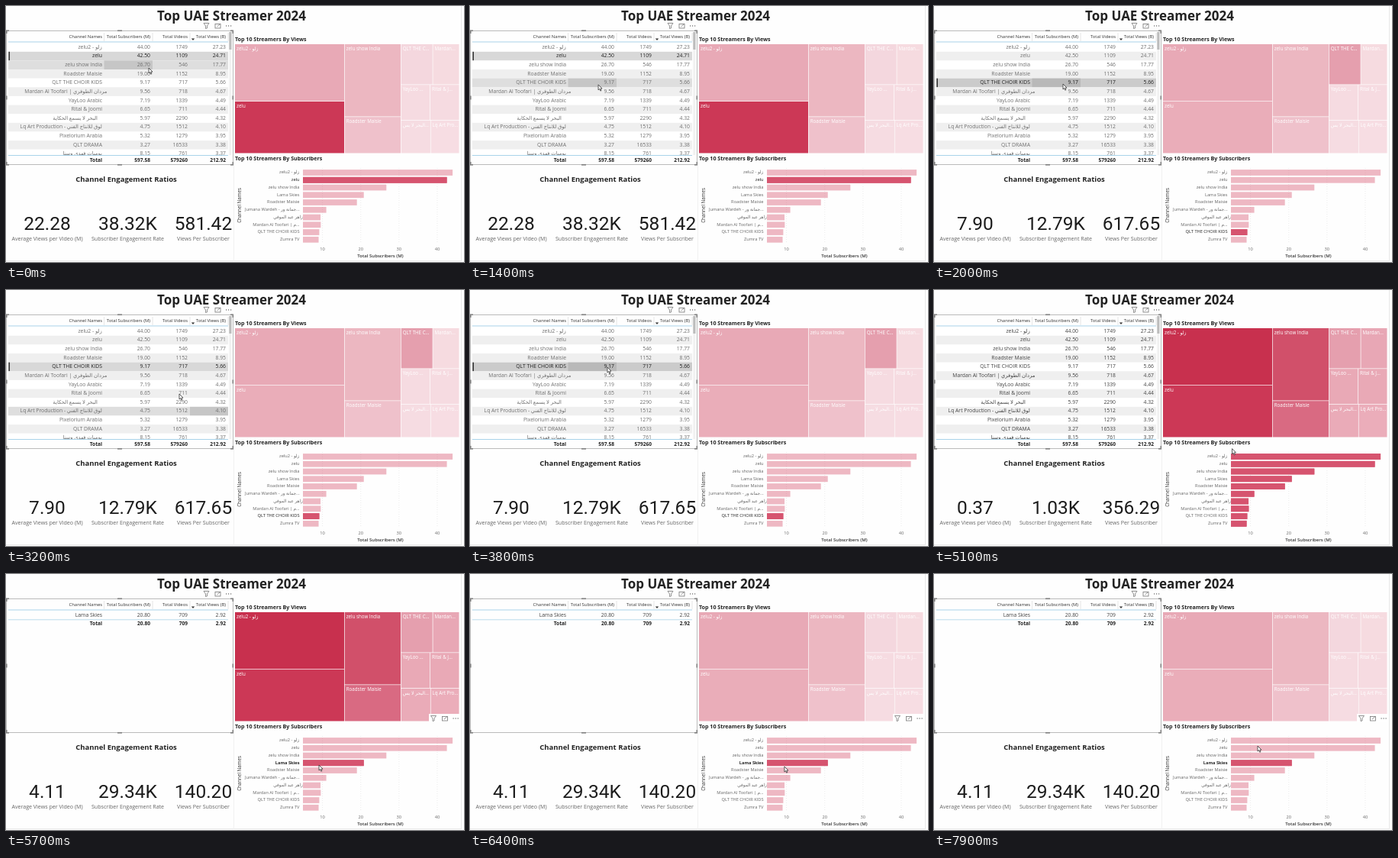
Recreate the animation shown at these times as an HTML page with a canvas. Size 600 by 335 pixels, loop 8 s.

```html
<!DOCTYPE html>
<html lang="en">
<head>
<meta charset="utf-8">
<title>Dashboard</title>
<style>
html, body { margin: 0; width: 100%; height: 100%; overflow: hidden; background: #fff; }
canvas { display: block; width: 600px; height: 335px; }
</style>
</head>
<body>
<canvas id="stage"></canvas>
<script>
const W = 600, H = 335, LOOP = 8000;
const canvas = document.getElementById('stage');
const ctx = canvas.getContext('2d');
const dpr = window.devicePixelRatio || 1;
canvas.width = W * dpr;
canvas.height = H * dpr;

const UI = '"Open Sans", "Noto Sans", sans-serif';
const DIGITS = '"Roboto", sans-serif';
const GREY = '#666', DARK = '#222', DIM = 0.41;

const rows = [
  ['zelu2 - زلو', '44.00', '1749', '27.23'],
  ['zelu', '42.50', '1109', '24.71'],
  ['zelu show India', '26.70', '546', '17.77'],
  ['Roadster Maisie', '19.00', '1152', '8.95'],
  ['QLT THE CHOIR KIDS', '9.17', '717', '5.66'],
  ['Mardan Al Toofari | مردان الطوفري', '9.56', '718', '4.67'],
  ['YayLoo Arabic', '7.19', '1339', '4.49'],
  ['Rital & Joomi', '6.65', '711', '4.44'],
  ['البحر لا يسمع الحكاية', '5.97', '2290', '4.32'],
  ['Lq Art Production - لوق للانتاج الفني', '4.75', '1512', '4.10'],
  ['Pixelorium Arabia', '5.32', '1279', '3.95'],
  ['QLT DRAMA', '3.27', '16533', '3.38'],
  ['يوميات فهدي وسنا', '8.15', '761', '3.37']
];
const star = ['Lama Skies', '20.80', '709', '2.92'];
const colRight = [126, 189, 238, 288];
const colEdge = [4, 128.5, 192, 241, 291];
const ROW0 = 54, PITCH = 11.63;

// label, x, y, width, height, colour
const tiles = [
  ['zelu2 - زلو', 300, 50, 143, 74.3, '#c8304e'],
  ['zelu', 300, 125, 143, 67.5, '#cc3856'],
  ['zelu show India', 443.7, 50, 73.3, 94.5, '#d1506a'],
  ['Roadster Maisie', 443.7, 145.2, 73.3, 47.3, '#d96a82'],
  ['QLT THE C...', 517.7, 50, 41, 52.5, '#e59fae'],
  ['Mardan...', 559.4, 50, 34.1, 52.5, '#e8a7b5'],
  ['YayLoo ...', 517.7, 103.2, 37.6, 45.8, '#e9a9b6'],
  ['Rital & J...', 556, 103.2, 37.5, 45.8, '#e9a9b6'],
  ['البحر لا يس...', 517.7, 149.7, 38.2, 42.8, '#eaabb8'],
  ['Lq Art Pro...', 556.6, 149.7, 36.9, 42.8, '#ebadba']
];

const bars = [
  ['zelu2 - زلو', 44], ['zelu', 42.5], ['zelu show India', 26.7],
  ['Lama Skies', 20.8], ['Roadster Maisie', 19], ['Jumana Wardeh - جمانة ور...', 11],
  ['زاهر عبد الموفي', 9.5], ['Mardan Al Toofari | م...', 9.56],
  ['QLT THE CHOIR KIDS', 9.17], ['Zumra TV', 9]
];

const states = [
  { from: 0, row: 1, tile: 1, bar: 1, kpi: ['22.28', '38.32K', '581.42'] },
  { from: 1900, row: 4, tile: 4, bar: 8, kpi: ['7.90', '12.79K', '617.65'] },
  { from: 4150, row: -1, tile: 4, bar: 8, kpi: ['0.37', '1.03K', '356.29'] },
  { from: 5600, row: -1, tile: -1, bar: 3, kpi: ['4.11', '29.34K', '140.20'], filtered: true }
];
const kpiLabels = [
  ['Average Views per Video (M)', 54],
  ['Subscriber Engagement Rate', 159.5],
  ['Views Per Subscriber', 258.5]
];

// time, x, y of the pointer tip
const path = [
  [0, 187, 81], [600, 187, 81], [1300, 168, 103], [1900, 169, 102], [2500, 169, 102],
  [3080, 266, 160], [3200, 227, 136], [3600, 180, 101], [4000, 180, 101],
  [4180, 330, 150], [4300, 365, 153], [4800, 366, 154], [5350, 409, 248],
  [5700, 410, 250], [6500, 412, 252], [7600, 424, 225], [8000, 424, 225]
];

const clamp = v => Math.max(0, Math.min(1, v));

function pointer(t) {
  t = Math.max(0, t);
  let i = 0;
  while (i < path.length - 2 && path[i + 1][0] <= t) i++;
  const [t0, x0, y0] = path[i], [t1, x1, y1] = path[i + 1];
  const p = clamp((t - t0) / (t1 - t0)), k = p * p * (3 - 2 * p);
  return [x0 + (x1 - x0) * k, y0 + (y1 - y0) * k];
}

function rect(x, y, w, h, fill, alpha = 1) {
  ctx.globalAlpha = alpha;
  ctx.fillStyle = fill;
  ctx.fillRect(x, y, w, h);
  ctx.globalAlpha = 1;
}

function line(x0, y0, x1, y1, color, width = 1) {
  ctx.strokeStyle = color;
  ctx.lineWidth = width;
  ctx.beginPath();
  ctx.moveTo(x0, y0);
  ctx.lineTo(x1, y1);
  ctx.stroke();
}

function text(s, x, y, size, { align = 'left', color = GREY, weight = 400, family = UI } = {}) {
  ctx.font = `${weight} ${size}px ${family}`;
  ctx.textAlign = align;
  ctx.fillStyle = color;
  ctx.fillText(s, x, y);
}

function icons(x, y) {
  ctx.strokeStyle = '#777';
  ctx.lineWidth = 0.8;
  ctx.beginPath();
  ctx.moveTo(x - 3.5, y - 3.5);
  ctx.lineTo(x + 3.5, y - 3.5);
  ctx.lineTo(x + 1, y);
  ctx.lineTo(x + 1, y + 3);
  ctx.lineTo(x - 1, y + 3.5);
  ctx.lineTo(x - 1, y);
  ctx.closePath();
  ctx.stroke();
  ctx.strokeRect(x + 11.5, y - 2.5, 7, 5.5);
  line(x + 14, y + 1, x + 18, y - 2.5, '#777', 0.8);
  for (let i = 0; i < 3; i++) rect(x + 25.5 + i * 3, y - 0.6, 1.2, 1.2, '#666');
}

function frameBox() {
  ctx.strokeStyle = '#bbb';
  ctx.lineWidth = 1;
  ctx.strokeRect(0.5, 32.5, 297, 175);
  const c = '#808080';
  for (const x of [0, 294]) for (const y of [31.5, 207]) rect(x, y, 4, 1.6, c);
  for (const x of [0, 296.5]) {
    rect(x, 32, 1.6, 4, c);
    rect(x, 204, 1.6, 4, c);
    rect(x, 117.5, 1.6, 5, c);
  }
  rect(146, 31.5, 6, 1.6, c);
  rect(146, 207, 6, 1.6, c);
}

function cells(data, y, size, style) {
  data.forEach((s, i) => text(s, colRight[i], y, size, { align: 'right', ...style }));
}

function drawTable(state, t) {
  frameBox();
  cells(['Channel Names', 'Total Subscribers (M)', 'Total Videos', 'Total Views (B)'], 40.3, 5.9, { color: '#333' });
  for (const x of colEdge.slice(1)) line(x, 35, x, 46, '#ddd', 0.7);
  ctx.fillStyle = '#333';
  ctx.beginPath();
  ctx.moveTo(242.8, 42.5);
  ctx.lineTo(247.2, 42.5);
  ctx.lineTo(245, 45);
  ctx.fill();
  line(3, 47, 291, 47, '#a9d3ea', 1);

  const bold = { color: DARK, weight: 700 };
  if (state.filtered) {
    cells(star, ROW0, 6.8, { color: '#444' });
    line(3, 59.8, 291, 59.8, '#a9d3ea', 0.8);
    cells(['Total', ...star.slice(1)], 65.6, 6.6, bold);
    return;
  }

  const [mx, my] = pointer(t - 100);
  const inside = mx < 291 && my > 48 && my < 195;
  const hot = inside ? Math.floor((my - ROW0) / PITCH + 0.5) : -1;
  const col = colEdge.findIndex((x, i) => mx >= x && mx < colEdge[i + 1]);
  const plain = state.row < 0 ? '#444' : '#707070';

  ctx.save();
  ctx.beginPath();
  ctx.rect(2, 47.6, 289, 147.6);
  ctx.clip();
  rows.forEach((data, i) => {
    const y = ROW0 + i * PITCH, top = y - PITCH / 2, picked = i === state.row;
    const both = picked && i === hot;
    const fill = both ? '#cbcbcb' : picked ? '#d8d8d8' : i === hot ? '#dedede' : i % 2 ? '#efefef' : '#fff';
    rect(3, top, 288, PITCH, fill);
    if (i === hot && col >= 0) {
      rect(colEdge[col], top, colEdge[col + 1] - colEdge[col], PITCH, both ? '#b9b9b9' : '#c6c6c6');
    }
    if (picked) rect(3.5, top, 1.4, PITCH, '#222');
    cells(data, y, 6.8, { color: picked ? DARK : plain });
  });
  ctx.restore();

  line(3, 195.5, 291, 195.5, '#a9d3ea', 1);
  cells(['Total', '597.58', '579260', '212.92'], 202.1, 6.6, bold);
  rect(292.3, 34, 3.2, 161, '#f1f1f1');
  rect(292.3, 34, 3.2, 23, '#bdbdbd');
}

function drawKpis(state) {
  text('Channel Engagement Ratios', 157.5, 227.8, 9.5, { align: 'center', color: DARK, weight: 700 });
  kpiLabels.forEach(([label, x], i) => {
    text(state.kpi[i], x, 286, 24.5, { align: 'center', color: '#1c1c1c', family: DIGITS });
    text(label, x, 305.5, 7.1, { align: 'center' });
  });
}

function drawTreemap(state, t, grow) {
  text('Top 10 Streamers By Views', 300, 43.7, 7.1, { color: DARK, weight: 700 });
  const full = t >= 4150 && t < 5800 ? grow : 0;
  tiles.forEach(([label, x, y, w, h, color], i) => {
    const part = i === state.tile ? 1 : full;
    rect(x, y, w, h * (1 - part), color, DIM);
    rect(x, y + h * (1 - part), w, h * part, color);
    text(label, x + 2, y + 6.2, 6.2, { color: '#fff' });
  });
}

function drawBars(state, grow) {
  text('Top 10 Streamers By Subscribers', 300, 200.2, 7.1, { color: DARK, weight: 700 });
  const at = v => 364.4 + 5.015 * v;
  for (let v = 10; v <= 40; v += 10) {
    ctx.setLineDash([1, 2]);
    line(at(v), 212, at(v), 311, '#e4e4e4', 0.7);
    ctx.setLineDash([]);
    text(String(v), at(v), 319, 5.7, { align: 'center' });
  }
  bars.forEach(([label, v], i) => {
    const y = 218 + i * 9.75, x = 389, w = at(v) - x;
    const picked = i === state.bar;
    const shown = picked ? 1 : grow;
    // the dimmed bar fades back while its highlight sweeps across
    rect(x, y - 3.9, w, 7.8, '#d6546f', DIM + (1 - DIM) * shown);
    rect(x, y - 3.9, w * shown, 7.8, '#d6546f', shown);
    const strong = picked && grow === 0;
    const weight = strong && state.filtered ? 700 : 400;
    text(label, 384.5, y, 5.7, { align: 'right', color: strong ? DARK : GREY, weight });
  });
  text('Total Subscribers (M)', 490.5, 327.6, 6, { align: 'center', color: '#333', weight: 600 });
  ctx.save();
  ctx.translate(306.2, 261);
  ctx.rotate(-Math.PI / 2);
  text('Channel Names', 0, 0, 6.2, { align: 'center', color: '#333' });
  ctx.restore();
}

function drawPointer(t) {
  const [x, y] = pointer(t);
  const shape = [[0, 0], [0, 7], [1.6, 5.6], [2.8, 8.2], [3.9, 7.7], [2.8, 5.2], [5, 5.1]];
  ctx.beginPath();
  shape.forEach(([dx, dy]) => ctx.lineTo(x + dx, y + dy));
  ctx.closePath();
  ctx.fillStyle = '#fff';
  ctx.fill();
  ctx.strokeStyle = '#333';
  ctx.lineWidth = 0.8;
  ctx.stroke();
}

function draw(t) {
  ctx.setTransform(dpr, 0, 0, dpr, 0, 0);
  ctx.textBaseline = 'middle';
  ctx.direction = 'ltr';
  rect(0, 0, W, H, '#fefefe');
  line(596.5, 0, 596.5, 333, '#e3e3e3', 0.8);
  line(0, 333.5, 597, 333.5, '#e3e3e3', 0.8);
  line(298.5, 208, 298.5, 333, '#eee', 0.8);

  const state = states.filter(s => s.from <= t).pop();
  const grow = state.filtered || t < 4150 ? 0 : clamp((t - 4180) / 295);
  text('Top UAE Streamer 2024', 295.5, 15, 17, { align: 'center', color: DARK, weight: 700 });
  icons(262.5, 26);
  drawTable(state, t);
  drawKpis(state);
  drawTreemap(state, t, state.filtered ? 1 : grow);
  drawBars(state, grow);
  if (state.filtered) {
    rect(554, 183, 41, 11, '#fff');
    icons(560, 189);
  }
  drawPointer(t);
}

function tick(now) {
  draw(now % LOOP);
  requestAnimationFrame(tick);
}
requestAnimationFrame(tick);
</script>
</body>
</html>
```
